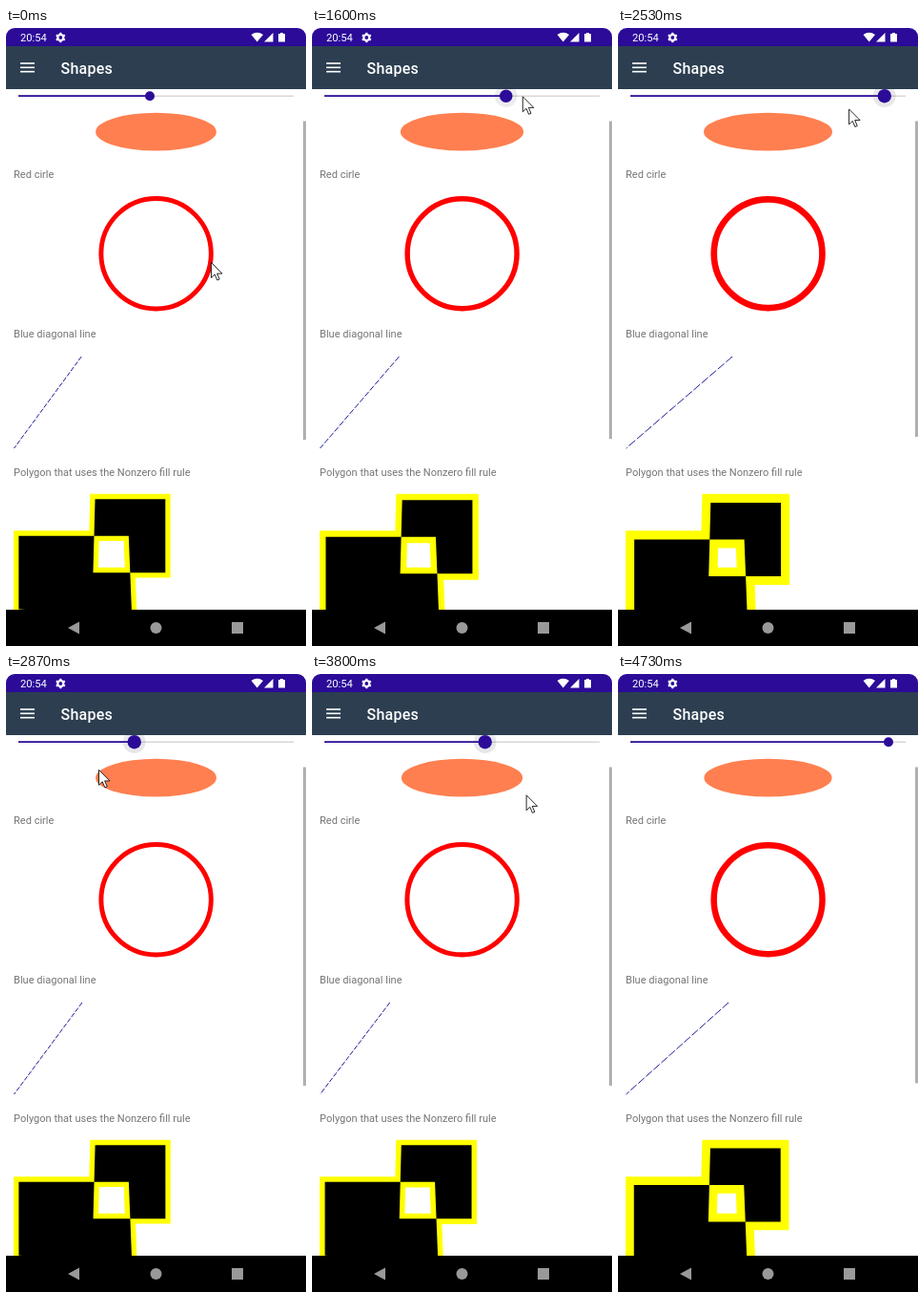
Write an HTML page with a canvas that moves like this. It is 315x647 px and loops after 5340 ms.

```html
<!DOCTYPE html>
<html lang="en">
<head>
<meta charset="utf-8">
<title>Shapes</title>
<style>
html, body { margin: 0; width: 100%; height: 100%; overflow: hidden; background: #fff; }
canvas { display: block; width: 315px; height: 647px; }
</style>
</head>
<body>
<canvas id="stage" width="315" height="647"></canvas>
<script>
const ctx = document.getElementById('stage').getContext('2d');
const LOOP = 5340, DP = 0.802, TAU = Math.PI * 2;
const PURPLE = '#2b0b98', GREY = '#999', FONT = 'Roboto, sans-serif';
const MIN = 13, MAX = 302, TRACK_Y = 71.2;

// Pointer poses [step, x, y] at 15 steps per second: approach, three drags, exit
const poses = [[0, 215, 245], [9, 151, 70], [12, 151, 69], [19.5, 151, 69], [29.3, 303, 74],
  [35.9, 303, 78], [46, 10, 109], [52.3, 10, 113], [58.3, 284, 130], [61, 284, 134],
  [69, 137, 594], [70, 117, 601]];

const clamp = (v, lo = 0, hi = 1) => Math.max(lo, Math.min(hi, v));

function pointerAt(k) {
  const n = Math.max(1, poses.findIndex(p => p[0] >= k));
  const [ka, xa, ya] = poses[n - 1], [kb, xb, yb] = poses[n];
  const u = (k - ka) / (kb - ka);
  return [xa + (xb - xa) * u, ya + (yb - ya) * u];
}

// The thumb trails the pointer, and the shapes trail the thumb
const dragLag = k => k < 33 ? 1.1 : k < 50 ? 1.3 : 0.94;
function dragX(k, trail) {
  const held = clamp(k, 19, 61);
  return clamp(pointerAt(held - trail * dragLag(k))[0], MIN, MAX - 1);
}

function rect(color, x, y, w, h) {
  ctx.fillStyle = color;
  ctx.fillRect(x, y, w, h);
}

function disc(color, x, y, rx, ry = rx) {
  ctx.fillStyle = color;
  ctx.beginPath();
  ctx.ellipse(x, y, rx, ry, 0, 0, TAU);
  ctx.fill();
}

function ring(color, width, x, y, r) {
  ctx.strokeStyle = color;
  ctx.lineWidth = width;
  ctx.beginPath();
  ctx.arc(x, y, r, 0, TAU);
  ctx.stroke();
}

function line(color, width, x1, y1, x2, y2) {
  ctx.strokeStyle = color;
  ctx.lineWidth = width;
  ctx.beginPath();
  ctx.moveTo(x1, y1);
  ctx.lineTo(x2, y2);
  ctx.stroke();
}

function text(str, x, y, size, color, weight = 400) {
  ctx.font = `${weight} ${size}px ${FONT}`;
  ctx.fillStyle = color;
  ctx.fillText(str, x, y);
}

function fill(color, d) {
  ctx.fillStyle = color;
  ctx.fill(new Path2D(d));
}

const polygonPath = new Path2D('M0 48V144L96 150 100 0H192V96H50L48 192 150 200 144 48Z');
const arrow = new Path2D('M.5 .5V16.5L4.2 13 6.8 19 9.2 18 6.6 12.1H12Z');

function slider(k) {
  const x = dragX(k, 1);
  const press = clamp((k - 20) / 5) * clamp((66 - k) / 5);
  line('#d8d8d8', 1.6, MIN, TRACK_Y, MAX, TRACK_Y);
  line(PURPLE, 1.8, MIN, TRACK_Y, x, TRACK_Y);
  disc(`rgba(60,55,80,${0.12 * press})`, x, TRACK_Y, 11.8);
  disc(PURPLE, x, TRACK_Y, 5 + 2.2 * press);
}

function polygon(edge) {
  ctx.save();
  ctx.translate(8 + edge, 487.8 + edge);
  ctx.scale(DP, DP);
  ctx.strokeStyle = '#ff0';
  ctx.lineWidth = 2 * edge / DP;
  ctx.stroke(polygonPath);
  ctx.fillStyle = '#000';
  ctx.fill(polygonPath);
  ctx.restore();
}

function content(k) {
  const v = (dragX(k, 1.5) - MIN) / (MAX - MIN);
  slider(k);
  disc('#ff7f50', 157.5, 108.7, 59.5 + 8.1 * v, 19.9);

  const w = 3.3 + 3.4 * v;
  ring('#f00', w, 157.6, 236.2, 60.2 - w / 2);

  ctx.setLineDash([1.4 + 7.6 * v, 1.3 + v]);
  line('#00008b', 0.9, 41 + 80 * v, 344, 8.5, 440);
  ctx.setLineDash([]);

  polygon(1.8 + 7.4 * v);

  text('Red cirle', 8, 157, 11.05, '#757575');
  text('Blue diagonal line', 8, 324, 11.05, '#757575');
  text('Polygon that uses the Nonzero fill rule', 8, 469, 11.05, '#757575');
  rect('#b0b0b0', 312, 97.5, 3, 336.5 - 6 * v);
}

function gear(x, y) {
  ring('#fff', 2.2, x, y, 3);
  for (let i = 0; i < 6; i++) {
    const a = (i + 0.5) * TAU / 6, c = Math.cos(a), s = Math.sin(a);
    line('#fff', 2.2, x + 3 * c, y + 3 * s, x + 5.2 * c, y + 5.2 * s);
  }
}

function bars() {
  rect('#fff', 0, 0, 315, 20);
  ctx.fillStyle = PURPLE;
  ctx.beginPath();
  ctx.roundRect(0, 0, 315, 30, 9);
  ctx.fill();
  text('20:54', 15, 14, 11.2, '#fff');
  gear(57.3, 10);
  fill('#fff', 'M257.5 7Q263.7 2.6 270 7L263.7 14.5Z');
  fill('#fff', 'M271 14.5L280.5 5V14.5Z');
  fill('#fff', 'M286 6H288V5H291V6H293V14.6H286Z');

  rect('#2c3e50', 0, 19, 315, 45);
  for (let i = 0; i < 3; i++) rect('#fff', 15, 36.2 + 4.35 * i, 15, 1.6);
  ctx.letterSpacing = '0.25px';
  text('Shapes', 57.5, 48, 16, '#fff', 500);
  ctx.letterSpacing = '0px';

  rect('#000', 0, 609, 315, 38);
  fill(GREY, 'M65 628L77 621.5V634.5Z');
  disc(GREY, 157.5, 628, 6);
  rect(GREY, 237, 622, 12, 12);
}

function pointer(k) {
  if (k > 70) return;
  ctx.save();
  ctx.translate(...pointerAt(k));
  ctx.fillStyle = '#fff';
  ctx.fill(arrow);
  ctx.strokeStyle = '#111';
  ctx.lineWidth = 0.9;
  ctx.stroke(arrow);
  ctx.restore();
}

function draw(now) {
  const k = Math.floor((Math.floor(now % LOOP / 10) + 0.5) * 0.15);
  rect('#fff', 0, 0, 315, 647);
  content(k);
  bars();
  pointer(k);
  requestAnimationFrame(draw);
}
requestAnimationFrame(draw);
</script>
</body>
</html>
```
